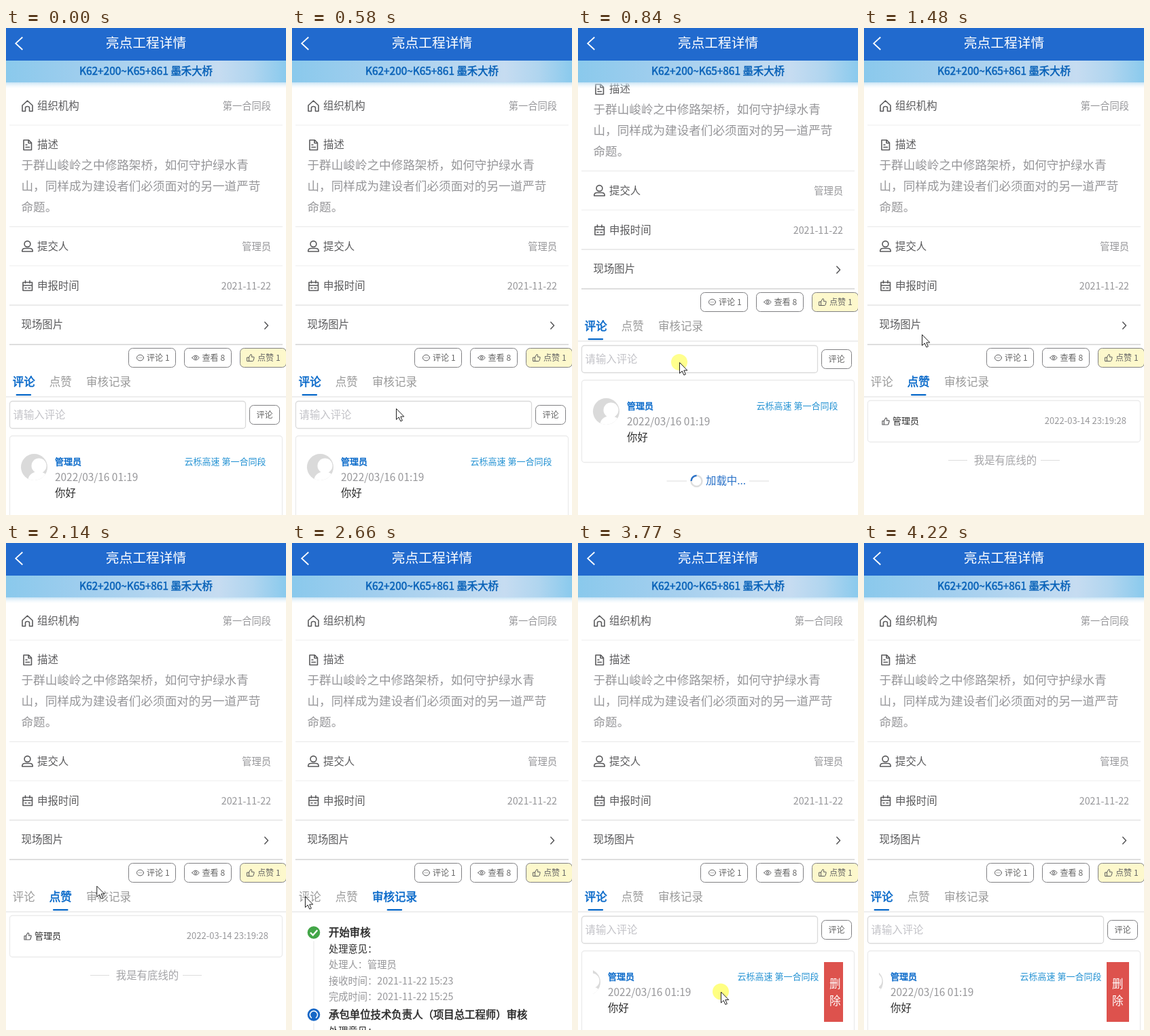
Animation, 412 px wide and 717 px high, one loop 4550 ms. Source, as an HTML page:

```html
<!DOCTYPE html>
<html lang="zh-CN">
<head>
<meta charset="utf-8">
<title>亮点工程详情</title>
<style>
html, body { margin: 0; height: 100%; overflow: hidden; background: #fff; }
svg { display: block; width: 100vw; height: 100vh; }
text { font-family: "Noto Sans CJK SC", "Noto Sans CJK", "Noto Sans", sans-serif; font-size: 15.4px; fill: #5a5a5c; white-space: pre; }
.end { text-anchor: end; }
.mid { text-anchor: middle; }
.xs { font-size: 12.1px; fill: #666; }
.sm { font-size: 13px; }
.md { font-size: 14.28px; }
.tab { font-size: 16.5px; fill: #999; }
.lg { font-size: 17.6px; }
.xl { font-size: 19.8px; fill: #fff; }
.grey { fill: #969699; }
.pale { fill: #c3c3c8; }
.dark { fill: #2b2b2b; }
.blue { fill: #0768c9; }
.sky { fill: #2492d3; }
.white { fill: #fff; }
.bold { stroke: #2b2b2b; stroke-width: .55px; }
.blue.bold, .tab.on { stroke: #0768c9; stroke-width: .55px; }
.tab.on { fill: #0768c9; }
.icon { fill: none; stroke: #5a5a5c; stroke-width: 1.6; stroke-linejoin: round; stroke-linecap: round; }
.thin { stroke-width: 1; }
.btn { fill: #fff; stroke: #808083; }
.card { fill: #fff; stroke: #ebebeb; stroke-width: 1.3; }
.rule { stroke: #ddd; }
</style>
</head>
<body>
<svg viewBox="0 0 412 717">
<defs>
  <linearGradient id="sky">
    <stop offset="0" stop-color="#8ac9ec"/><stop offset=".3" stop-color="#a1ceee"/>
    <stop offset=".76" stop-color="#c6dcf1"/><stop offset=".88" stop-color="#b0d5ef"/>
    <stop offset="1" stop-color="#8acaed"/>
  </linearGradient>
  <linearGradient id="shade" x2="0" y2="1">
    <stop stop-color="#b9dcf2" stop-opacity=".8"/><stop offset="1" stop-color="#e8f4fb" stop-opacity="0"/>
  </linearGradient>
  <clipPath id="cell"><path d="M22 617H390V705H22Z"/></clipPath>
  <clipPath id="disc"><circle cx="41.5" cy="646.5" r="19.5"/></clipPath>
  <path id="thumb" d="M-5-.5H-2.5V5H-5ZM-2.5-.5L0-5Q2-5 1.7-2.8L1.4-1.2H4.8Q5.4-1 5 .5L4 4Q3.7 5 2.8 5H-2.5"/>
  <g id="bottom">
    <path class="rule" d="M124 0H152M260 0H288"/>
    <text class="mid" x="208" y="5" style="fill:#a5a5a8">我是有底线的</text>
  </g>
</defs>

<g id="page">
  <rect x="5" y="86" width="402" height="380" rx="3" fill="#fff"/>
  <path d="M5 143H407M5 350H407" stroke="#f4f4f4" stroke-width="1.4"/>
  <path d="M5 292.5H407" stroke="#ededed" stroke-width="1.4"/>
  <path d="M5 408H407" stroke="#e4e4e4" stroke-width="1.6"/>
  <path d="M5 466H407" stroke="#dedede" stroke-width="2"/>

  <g class="icon">
    <path d="M24 114L31.5 107L39 114V122.5H34.5V117.5Q34.5 115.5 31.5 115.5T28.5 117.5V122.5H24Z"/>
    <path d="M26 165H33.5L37.5 169V179.5H26ZM33 165V169.5H37.5M29 172H31M29 175.5H34.5"/>
    <circle cx="31.5" cy="318" r="4.4"/>
    <path d="M23.8 329V328Q24 324.5 28 324.5H35Q39 324.5 39.2 328V329Z"/>
    <path d="M25 374.5H38.5V386.5H25ZM25 379H38.5M28.5 372V375.5M35 372V375.5M28 382.8H30M33 382.8H35.5"/>
    <path d="M380.8 433L385.5 438L380.8 443"/>
  </g>
  <text x="46" y="120">组织机构</text>
  <text class="md grey end" x="390" y="120">第一合同段</text>
  <text x="46" y="177">描述</text>
  <text class="lg grey" x="22.5" y="208">于群山峻岭之中修路架桥，如何守护绿水青</text>
  <text class="lg grey" x="22.5" y="239">山，同样成为建设者们必须面对的另一道严苛</text>
  <text class="lg grey" x="22.5" y="270">命题。</text>
  <text x="46" y="327">提交人</text>
  <text class="md grey end" x="390" y="327">管理员</text>
  <text x="46" y="385">申报时间</text>
  <text class="md grey end" x="390" y="385">2021-11-22</text>
  <text x="22.5" y="442">现场图片</text>

  <rect class="btn" x="180.5" y="471.5" width="69" height="28" rx="6"/>
  <rect class="btn" x="262.5" y="471.5" width="69" height="28" rx="6"/>
  <rect class="btn" x="344.5" y="471.5" width="68" height="28" rx="6" style="fill:#fdf8cc"/>
  <g class="icon thin">
    <ellipse cx="197.5" cy="485.5" rx="5" ry="4.3"/>
    <path d="M195.3 485.6h.1M197.5 485.6h.1M199.7 485.6h.1"/>
    <path d="M273.8 485.5Q279 478.5 284.2 485.5Q279 492.5 273.8 485.5Z"/>
    <circle cx="279" cy="485.5" r="1.7"/>
    <use href="#thumb" x="360" y="485.5"/>
  </g>
  <text class="xs" x="207" y="490">评论 1</text>
  <text class="xs" x="288.5" y="490">查看 8</text>
  <text class="xs" x="370" y="490">点赞 1</text>

  <text class="tab" x="9.8" y="527">评论</text>
  <text class="tab" x="63.8" y="527">点赞</text>
  <text class="tab" x="118" y="527">审核记录</text>
  <path d="M0 543H412" stroke="#e9e9e9" stroke-width="1.3"/>
  <rect id="line" y="539" width="22.5" height="2.2" rx="1" class="blue"/>

  <g class="pane">
    <rect class="card" x="5.5" y="549.5" width="347" height="40" rx="4" style="stroke:#dadada"/>
    <text class="pale" x="10.5" y="575">请输入评论</text>
    <rect class="btn" x="358.5" y="555.5" width="44" height="28" rx="6"/>
    <text class="xs mid" x="380.5" y="574">评论</text>
    <rect class="card" x="5.5" y="600.5" width="401" height="121" rx="4"/>
    <g clip-path="url(#cell)"><g id="swipe">
      <g clip-path="url(#disc)">
        <path d="M22 627H61V666H22Z" fill="#dadada"/>
        <circle cx="48.5" cy="644.5" r="11" fill="#fff"/>
        <ellipse cx="47.5" cy="666" rx="15" ry="13" fill="#fff"/>
      </g>
      <text class="sm blue bold" x="72" y="643">管理员</text>
      <text class="sm sky end" x="382.5" y="643">云栎高速 第一合同段</text>
      <text class="grey" x="72" y="667">2022/03/16 01:19</text>
      <text class="dark" x="72" y="690">你好</text>
      <path d="M390 617H423V705H390Z" fill="#dd524d"/>
      <text class="tab mid white" x="406.3" y="655">删</text>
      <text class="tab mid white" x="406.3" y="680">除</text>
    </g></g>
    <use id="done" href="#bottom" y="749"/>
    <g id="loading">
      <path class="rule" d="M130.5 749H160M252 749H281"/>
      <circle cx="174.5" cy="749" r="8" fill="none" stroke="#dedede" stroke-width="2.4"/>
      <path id="spin" d="M166.5 749A8 8 0 0 1 174.5 741" fill="none" stroke="#2a72c8" stroke-width="2.4"/>
      <text x="188" y="754" style="fill:#2a72c8">加载中...</text>
    </g>
  </g>

  <g class="pane">
    <rect class="card" x="5.5" y="548.5" width="401" height="61" rx="4"/>
    <use class="icon" href="#thumb" x="32" y="579" style="stroke-width:1.2"/>
    <text class="sm dark" x="42" y="583">管理员</text>
    <text class="sm grey end" x="386" y="583">2022-03-14 23:19:28</text>
    <use href="#bottom" y="636.5"/>
  </g>

  <g class="pane">
    <path d="M32 586V683M32 707V717" stroke="#eee" stroke-width="1.5"/>
    <circle cx="32" cy="573.5" r="9.3" fill="#43a648"/>
    <path d="M27 573.5L30.8 577.3L37.3 570" fill="none" stroke="#fff" stroke-width="2.2"/>
    <text class="dark bold" x="54" y="579">开始审核</text>
    <text class="md dark" x="54" y="603">处理意见：</text>
    <text class="md grey" x="54" y="626">处理人：管理员</text>
    <text class="md grey" x="54" y="650">接收时间：2021-11-22 15:23</text>
    <text class="md grey" x="54" y="673">完成时间：2021-11-22 15:25</text>
    <circle cx="32" cy="694.5" r="9.3" fill="#1767c6"/>
    <path d="M29 699.3A5.6 5.6 0 1 1 35 699.3" fill="none" stroke="#fff" stroke-width="1.5"/>
    <text class="dark bold" x="54" y="700">承包单位技术负责人（项目总工程师）审核</text>
    <text class="md dark" x="54" y="724">处理意见：</text>
  </g>
</g>

<path d="M0 80H412V89H0Z" fill="url(#shade)"/>
<path d="M0 48H412V80H0Z" fill="url(#sky)"/>
<path d="M0 0H412V48H0Z" fill="#216ace"/>
<path d="M24.3 13.5L14.3 22.7L24.3 32" fill="none" stroke="#fff" stroke-width="1.8"/>
<text class="xl mid" x="206" y="29">亮点工程详情</text>
<text class="mid blue bold" x="206" y="69" style="fill:#0962b8;stroke:#0962b8">K62+200~K65+861 墨禾大桥</text>

<g id="cursor">
  <circle id="press" r="12" fill="#ffff3c"/>
  <path d="M.5 .5V16.5L4.2 13L6.9 19L9.4 17.9L6.8 12.1H11.8Z" fill="#fff" stroke="#222"/>
</g>
</svg>

<script>
const LOOP = 4550, STEP = 65, LEAD = 15;
const MAX_SCROLL = 82, MAX_SWIPE = 33;
const $ = id => document.getElementById(id);
const panes = document.querySelectorAll('.pane');
const tabs = document.querySelectorAll('.tab:not(.white)');
const clamp = (v, lo, hi) => Math.min(hi, Math.max(lo, v));
const within = (k, [a, b]) => k >= a && k <= b;
const show = (el, on) => el.style.display = on ? '' : 'none';
const move = (el, x, y) => el.setAttribute('transform', `translate(${x} ${y})`);

// pointer path: tick, x, y
const path = [
  [1, 310, 684], [8, 160, 528], [9, 153, 560], [10, 152, 574], [11, 152, 514],
  [13, 149, 492], [14, 148, 484], [18, 85, 451], [26, 85, 451], [35, 147, 520],
  [37, 147, 520], [41, 19, 520], [45, 19, 520], [50, 188, 575], [52, 230, 593],
  [53, 230, 593], [56, 238, 655], [60, 182, 666], [62, 182, 666], [64, 297, 700]
];
const presses = [[10, 14], [18, 20], [36, 37], [44, 45], [56, 62]];
// tab switches: tick, tab
const switches = [[-9, 0], [19, 1], [36, 2], [45, 0]];
const lineX = [14.6, 69, 139.6];

function pointer(k) {
  const i = clamp(path.findIndex(p => p[0] >= k), 1, path.length - 1);
  const [a, b] = [path[i - 1], path[i]];
  const f = clamp((k - a[0]) / (b[0] - a[0]), 0, 1);
  return [a[1] + (b[1] - a[1]) * f, a[2] + (b[2] - a[2]) * f];
}

function draw(now) {
  const k = Math.floor((now % LOOP + LEAD) / STEP) % (LOOP / STEP);
  const [x, y] = pointer(k);
  move($('cursor'), x, y);
  show($('cursor'), within(k, [1, 64]));
  const press = presses.find(p => within(k, p));
  show($('press'), press);
  if (press) $('press').setAttribute('fill-opacity', .76 - .06 * (k - press[0]));

  const scroll = within(k, [10, 18]) ? clamp(574 - y, 0, MAX_SCROLL) : 0;
  move($('page'), 0, -scroll);
  const swipe = k < 56 ? 0 : k > 60 ? MAX_SWIPE : clamp(238 - x, 0, MAX_SWIPE);
  move($('swipe'), -swipe, 0);

  const n = switches.findLastIndex(s => k >= s[0]);
  const [start, tab] = switches[n];
  const from = n ? switches[n - 1][1] : tab;
  const ease = 1 - (1 - clamp((k - start) / 4, 0, 1)) ** 2;
  $('line').setAttribute('x', lineX[from] + (lineX[tab] - lineX[from]) * ease);
  panes.forEach((p, i) => show(p, i === tab));
  tabs.forEach((t, i) => t.classList.toggle('on', i === tab));

  const loading = within(k, [12, 16]);
  show($('loading'), loading);
  show($('done'), !loading);
  $('spin').setAttribute('transform', `rotate(${(k - 13) * 29} 174.5 749)`);
}

let origin;
function frame(now) {
  origin ??= now;
  draw(now - origin);
  requestAnimationFrame(frame);
}
draw(0);
requestAnimationFrame(frame);
</script>
</body>
</html>
```
